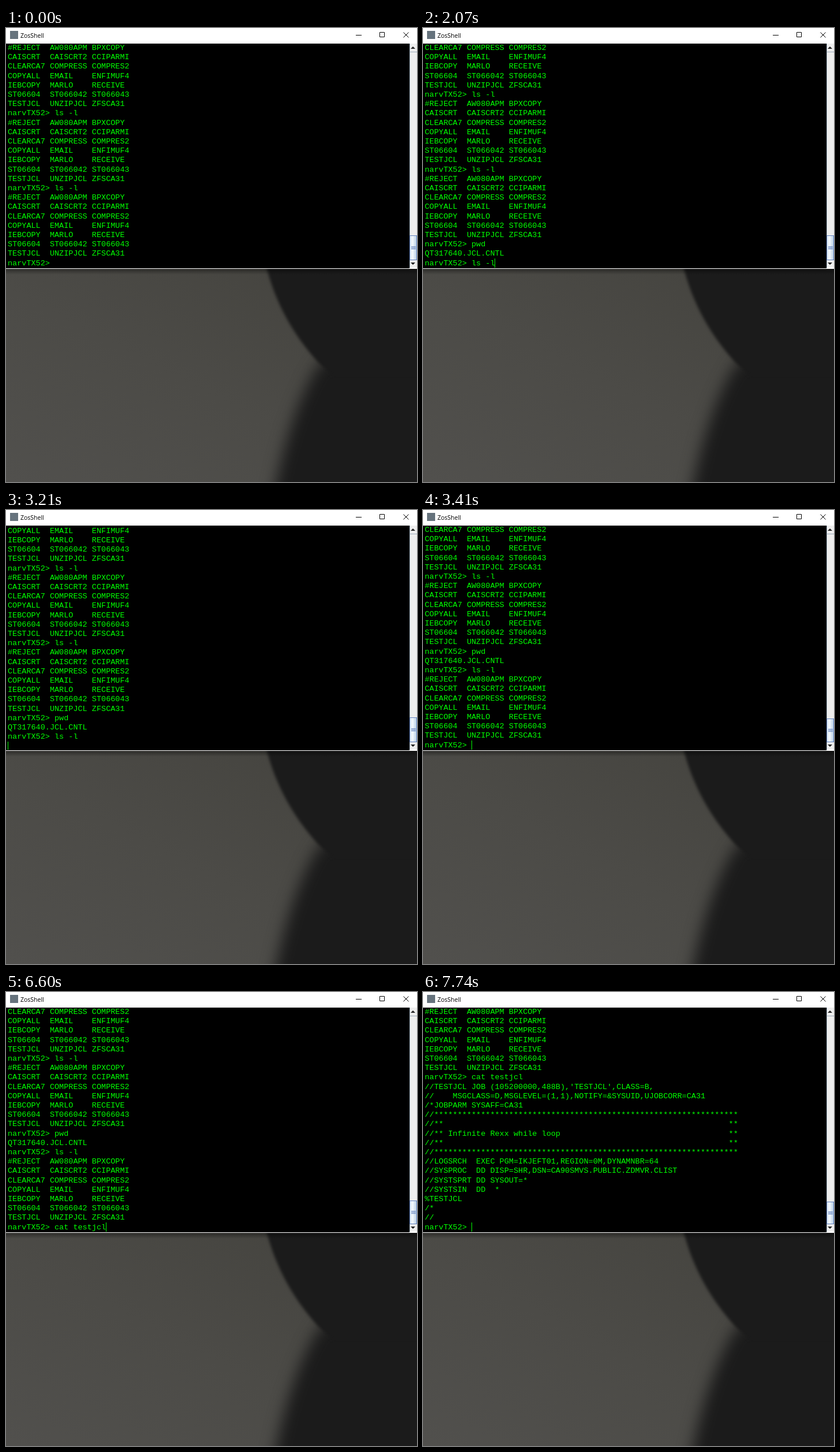
Animation, 712 px wide and 786 px high, one loop 8 s. Source, as an HTML page:

```html
<!DOCTYPE html>
<html lang="en">
<head>
<meta charset="utf-8">
<title>ZosShell</title>
<style>
  html, body { margin: 0; width: 100%; height: 100%; overflow: hidden; background: #1b1b1b; }
  #stage { position: relative; width: 712px; height: 786px; overflow: hidden; }
  svg { position: absolute; left: 0; top: 0; }
  filter { color-interpolation-filters: sRGB; }
  #title { position: absolute; left: 25px; top: 5px; font: 10.5px/16px "Open Sans", sans-serif; color: #000; }
  #term { position: absolute; left: 0; top: 27px; width: 699px; height: 388px; overflow: hidden; background: #000; }
  #text { position: absolute; left: 3px; margin: 0; color: #0f0;
          font: 13.5px/16.2px "Liberation Mono", "Courier New", monospace; }
  #caret { position: absolute; width: 1px; bottom: 0; background: #0f0; }
</style>
</head>
<body>
<div id="stage">
  <svg width="712" height="786">
    <defs>
      <linearGradient id="wall" x1="0" y1="1" x2="1" y2="0">
        <stop offset="0" stop-color="#51504d"/>
        <stop offset=".45" stop-color="#4c4b47"/>
        <stop offset="1" stop-color="#43423d"/>
      </linearGradient>
      <linearGradient id="shade" x1="0" y1="0" x2="0" y2="1">
        <stop offset="0" stop-color="#000" stop-opacity=".4"/>
        <stop offset="1" stop-color="#000" stop-opacity="0"/>
      </linearGradient>
      <linearGradient id="blue">
        <stop offset="0" stop-color="#d5e4f3"/>
        <stop offset=".4" stop-color="#f4f9fd"/>
        <stop offset="1" stop-color="#b5cde5"/>
      </linearGradient>
      <filter id="soft" x="-20%" y="-20%" width="140%" height="140%"><feGaussianBlur stdDeviation="2.5"/></filter>
      <filter id="blur" x="-20%" y="-20%" width="140%" height="140%"><feGaussianBlur stdDeviation="13"/></filter>
    </defs>

    <!-- wallpaper -->
    <rect y="415" width="712" height="371" fill="url(#wall)"/>
    <g fill="#1b1b1b">
      <path filter="url(#blur)" d="M546 576Q488 665 458 840H780V576Z"/>
      <path filter="url(#soft)" d="M444 397L452 417Q476 508 541 579L566 602H760V397Z"/>
    </g>
    <rect y="417" width="712" height="10" fill="url(#shade)"/>

    <!-- window frame -->
    <rect width="712" height="417" fill="#fff"/>
    <path d="M0 415.5h699" stroke="#000"/>
    <rect x="7" y="5" width="14" height="14" fill="#66737d"/>
    <path d="M606 12.5h10M647.5 7.5h8v8h-8zM688.5 7.5l9 9m0-9l-9 9" fill="none" stroke="#000"/>

    <!-- scrollbar -->
    <rect x="699" y="27" width="13" height="388" fill="#eee"/>
    <path d="M699.5 27v388M699 41.5h13M699 401.5h13" stroke="#9aa9b8"/>
    <path d="M701 36h8l-4-4zM701 406h8l-4 4z" fill="#222"/>
    <rect id="bar" x="699.5" width="12" fill="url(#blue)" stroke="#6382bf"/>
    <path id="grip" d="M702 0.5h8m-8 2h8m-8 2h8" stroke="#6382bf"/>
  </svg>
  <div id="title">ZosShell</div>
  <div id="term"><pre id="text"></pre><div id="caret"></div></div>
</div>
<script>
const LOOP = 8000, ROWS = 24, CHAR = 8.1016;
const prompt = 'narvTX52> ';
const listing = [
  '#REJECT  AW080APM BPXCOPY', 'CAISCRT  CAISCRT2 CCIPARMI',
  'CLEARCA7 COMPRESS COMPRES2', 'COPYALL  EMAIL    ENFIMUF4',
  'IEBCOPY  MARLO    RECEIVE', 'ST06604  ST066042 ST066043',
  'TESTJCL  UNZIPJCL ZFSCA31'
];
const stars = '//' + '*'.repeat(65);
const boxed = s => ('//** ' + s).padEnd(65) + '**';
const job = [
  "//TESTJCL JOB (105200000,488B),'TESTJCL',CLASS=B,",
  '//    MSGCLASS=D,MSGLEVEL=(1,1),NOTIFY=&SYSUID,UJOBCORR=CA31',
  '/*JOBPARM SYSAFF=CA31',
  stars, boxed(''), boxed('Infinite Rexx while loop'), boxed(''), stars,
  '//LOGSRCH  EXEC PGM=IKJEFT01,REGION=0M,DYNAMNBR=64',
  '//SYSPROC  DD DISP=SHR,DSN=CA90SMVS.PUBLIC.ZDMVR.CLIST',
  '//SYSTSPRT DD SYSOUT=*',
  '//SYSTSIN  DD  *',
  '%TESTJCL', '/*', '//'
];

// Screen history after each command
const ls = prompt + 'ls -l', cat = prompt + 'cat testjcl';
const start = [...listing, ls, ...listing, ls, ...listing];
const afterPwd = [...start, prompt + 'pwd', 'QT317640.JCL.CNTL'];
const lsSent = [...afterPwd, ls];
const afterLs = [...lsSent, ...listing];
const catSent = [...afterLs, cat];
const afterCat = [...catSent, ...job];

const steps = [];
// line is null while a command runs and no prompt is shown
const show = (time, log, line, caret, thumb) => steps.push({ time, log, line, caret, thumb });
const type = (log, text, thumb, times) =>
  times.forEach((t, i) => show(t, log, prompt + text.slice(0, i + 1), true, thumb));

show(0, start, prompt, false, 359);
type(start, 'pwd', 359, [200, 330, 400]);
show(600, afterPwd, prompt, true, 359);
show(1130, afterPwd, prompt, false, 359);
type(afterPwd, 'ls -l', 359, [1590, 1660, 1730, 1940, 2070]);
show(2200, lsSent, null, true, 359);
show(2730, lsSent, null, false, 359);
show(3210, lsSent, null, true, 359);
show(3410, afterLs, prompt, true, 361);
show(3940, afterLs, prompt, false, 361);
show(4400, afterLs, prompt, true, 361);
type(afterLs, 'cat testjcl', 361,
  [4730, 4930, 5000, 5130, 5330, 5460, 5590, 5720, 6250, 6400, 6600]);
show(7000, catSent, null, true, 361);
show(7470, catSent, null, false, 361);
show(7670, afterCat, null, true, 363);
show(7740, afterCat, prompt, true, 363);

const el = id => document.getElementById(id);
const text = el('text'), caret = el('caret'), bar = el('bar'), grip = el('grip');
let current;

function draw({ log, line, caret: on, thumb }) {
  const waiting = line === null;
  const rows = waiting ? log.slice(1 - ROWS) : [...log, line].slice(-ROWS);
  text.textContent = rows.join('\n');
  text.style.top = (waiting ? 1.7 : 0) + 'px';
  caret.style.left = Math.floor(3.1 + CHAR * (waiting ? 0 : line.length)) + 'px';
  caret.style.height = (waiting ? 14 : 16) + 'px';
  caret.style.visibility = on ? 'visible' : 'hidden';
  bar.setAttribute('y', thumb + 0.5);
  bar.setAttribute('height', 401 - thumb);
  grip.setAttribute('transform', `translate(0 ${Math.round((thumb + 401) / 2) - 2})`);
}

function tick(now) {
  const t = now % LOOP;
  const step = steps.findLast(s => s.time <= t) || steps[0];
  if (step !== current) draw(current = step);
  requestAnimationFrame(tick);
}
tick(performance.now());
</script>
</body>
</html>
```
